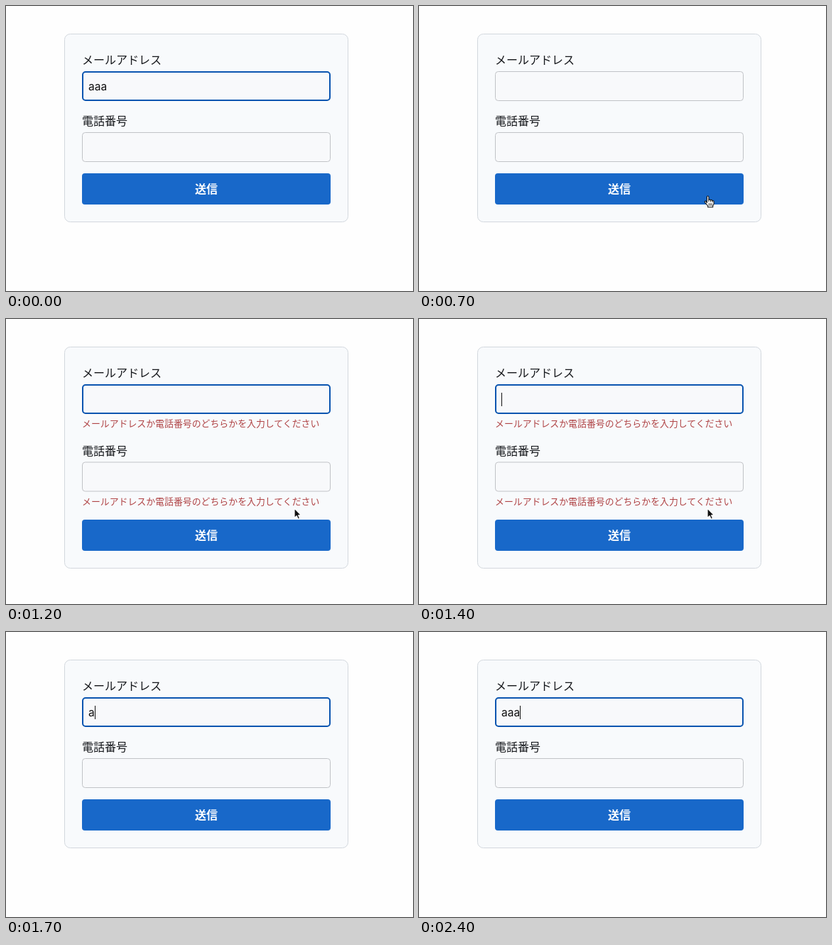
An HTML page that plays this animation: 573x402 px, repeating every 2.5 s.

```html
<!DOCTYPE html>
<html lang="ja">
<head>
<meta charset="utf-8">
<style>
  html, body { margin: 0; width: 100%; height: 100%; overflow: hidden; background: #fefefe; }
  svg { display: block; }
  text { font: 16px "Noto Sans CJK JP", "Noto Sans CJK", sans-serif; fill: #16181c; }
  .typed { font: 15.5px Inter, sans-serif; fill: #111; }
  .error { font-size: 12.9px; fill: #b04446; }
  .submit { font-weight: 700; fill: #fff; text-anchor: middle; }
  .card { fill: #f8fafc; stroke: #d3d8de; }
  .field { fill: #f8f9fb; stroke: #c1c3c7; }
  .field.focus { stroke: #0b55b0; stroke-width: 2; }
  .button { fill: #1868c9; }
</style>
</head>
<body>
<svg width="573" height="402" viewBox="0 0 573 402">
  <rect id="card" class="card" x="82.5" y="39.5" width="399" height="265" rx="8"/>
  <text x="107" y="82">メールアドレス</text>
  <rect id="email" class="field" x="107.5" y="92.5" width="349" height="41" rx="4"/>
  <text id="typed" class="typed" x="116" y="119"></text>
  <rect id="caret" x="116" y="104" width="1" height="19" fill="#111"/>
  <text id="emailError" class="error" x="107" y="152.4">メールアドレスか電話番号のどちらかを入力してください</text>
  <g id="phone">
    <text x="107" y="168">電話番号</text>
    <rect class="field" x="107.5" y="178.5" width="349" height="41" rx="4"/>
    <text id="phoneError" class="error" x="107" y="238.6">メールアドレスか電話番号のどちらかを入力してください</text>
  </g>
  <g id="submit">
    <rect class="button" x="107" y="236" width="350" height="44" rx="4"/>
    <text class="submit" x="282" y="264">送信</text>
  </g>
  <g id="arrow" stroke-linejoin="round">
    <path d="M0 0V13.5L3.2 10.7 5.3 15.4 7.6 14.4 5.6 9.8H9.6Z" fill="#111" stroke="#fff" stroke-width="1.2"/>
  </g>
  <g id="hand" stroke="#111" stroke-linecap="round" stroke-linejoin="round">
    <path d="M-1.6 9.6V1.3Q-1.6 0 -.4 0T.9 1.3V5.8Q1.2 4.9 2.3 5T3.5 6.2Q4 5.3 5 5.6T6 6.9Q6.5 6.3 7.4 6.7T8.1 8.2V11.2L6.7 13.8V15.8H-.3V14L-4.6 8.8Q-5.1 7.8 -4.2 7.3T-2.6 8Z" fill="#fff" stroke-width="1.1"/>
    <path d="M.9 5.8V8M3.5 6.2V8.2M6 7V8.6M1.3 10.5V13.5M3.3 10.5V13.5M5.2 10.5V13.5" fill="none" stroke-width=".8"/>
  </g>
  <g id="beam" fill="none" stroke-linecap="round">
    <path d="M-3-7.5Q0-7.5 0-5V5Q0 7.5-3 7.5M3-7.5Q0-7.5 0-5M3 7.5Q0 7.5 0 5M-1.8 3.5H1.8" stroke="#fff" stroke-width="2.8"/>
    <path d="M-3-7.5Q0-7.5 0-5V5Q0 7.5-3 7.5M3-7.5Q0-7.5 0-5M3 7.5Q0 7.5 0 5M-1.8 3.5H1.8" stroke="#111" stroke-width="1.2"/>
  </g>
</svg>
<script>
  const LOOP = 2500, STEP = 100, BLINK = 250, ERROR_HEIGHT = 23.5;
  const $ = id => document.getElementById(id);
  const show = (id, on) => $(id).setAttribute("visibility", on ? "visible" : "hidden");
  const move = (id, x, y) => $(id).setAttribute("transform", `translate(${x} ${y})`);
  const set = (id, attrs) => {
    for (const name in attrs) $(id).setAttribute(name, attrs[name]);
  };

  function pointerAt(t) {
    if (t < 100 || t >= 1700) return null;
    if (t >= 1600) return { shape: "beam", x: 401, y: 260 };
    const remaining = (1 - Math.min(1, (t - 100) / 400)) ** 3;
    const x = 406 + 40 * remaining, y = 267 + 29 * remaining;
    const overButton = t < 800 && y < 280;
    return overButton ? { shape: "hand", x: x + 1, y: y + 1 } : { shape: "arrow", x, y };
  }

  function typedAt(t) {
    if (t < 100) return "aaa";
    return "a".repeat(Math.max(0, Math.min(3, (t - 1600) / STEP)));
  }

  function caretAt(t) {
    if (t < 800) return false;
    if (t >= 1700 && t < 1900) return true;
    const start = t < 1700 ? 750 : 1900;
    return Math.floor((t - start) / BLINK) % 2 === 0;
  }

  function draw(t) {
    const focused = t < 100 || t >= 800;
    const invalid = t >= 800 && t < 1700;
    const shift = invalid ? ERROR_HEIGHT : 0;
    const typed = typedAt(t);
    const pointer = pointerAt(t);
    const inset = focused ? 0.5 : 0;

    set("card", { height: 265 + 2 * shift });
    set("email", {
      class: focused ? "field focus" : "field",
      x: 107.5 + inset, y: 92.5 + inset,
      width: 349 - 2 * inset, height: 41 - 2 * inset
    });
    move("phone", 0, shift);
    move("submit", 0, 2 * shift);
    show("emailError", invalid);
    show("phoneError", invalid);

    $("typed").textContent = typed;
    set("caret", { x: 116 + Math.round(typed.length * 8.5) });
    show("caret", caretAt(t));

    for (const shape of ["arrow", "hand", "beam"]) show(shape, pointer?.shape === shape);
    if (pointer) move(pointer.shape, pointer.x, pointer.y);
  }

  function tick() {
    const t = performance.now() % LOOP;
    draw(Math.floor(t / STEP) * STEP);
    requestAnimationFrame(tick);
  }
  tick();
</script>
</body>
</html>
```
